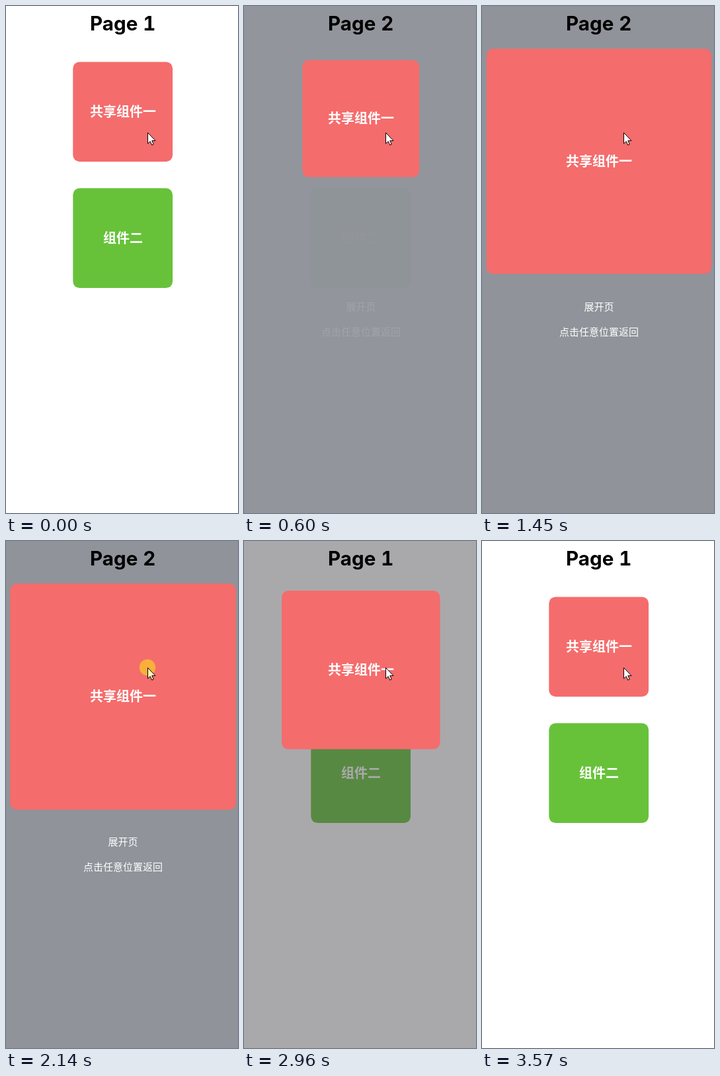
Animation of 351 by 766 pixels, one loop 3.85 s. Source, as an HTML page:

```html
<!DOCTYPE html>
<html lang="zh-CN">
<head>
<meta charset="utf-8">
<title>Shared element transition</title>
<style>
  html, body { margin: 0; width: 100%; height: 100%; overflow: hidden; background: #fff; }
  svg { display: block; width: 351px; height: 766px; }
  text { font-family: "Noto Sans CJK SC", "Noto Sans CJK", "Noto Sans", sans-serif; text-anchor: middle; }
  .title { font: 700 29.6px Inter, sans-serif; font-variant-numeric: tabular-nums; text-anchor: start; }
  .label { font-size: 20px; font-weight: 700; fill: #fff; }
  .note { font-size: 15px; fill: #fff; }
</style>
</head>
<body>
<svg viewBox="0 0 351 766">
  <rect width="351" height="766" fill="#fff"/>
  <rect x="101.3" y="275.3" width="150.8" height="150.8" rx="10" fill="#67c23a"/>
  <text class="label" x="177" y="357.7">组件二</text>
  <rect id="shade" width="351" height="766"/>
  <g id="notes">
    <text class="note" x="177" y="459.7">展开页</text>
    <text class="note" x="177" y="497.7">点击任意位置返回</text>
  </g>
  <text id="title" class="title" x="127" y="37">Page 1</text>
  <rect id="card" rx="10" fill="#f56c6c"/>
  <text id="label" class="label" x="177">共享组件一</text>
  <circle id="tap" cx="214" cy="191" r="12.2" fill="#f8b03a"/>
  <path id="arrow" d="M214.5 191.5v16.4l3.7-3.4 2.6 5.6 2.5-1.1-2.5-5.5h5.2z"
        stroke="#000" stroke-width="1" stroke-linejoin="round"/>
</svg>
<script>
const LOOP = 3850;
const OPEN = 514, SHOW = 600;
const CLOSE = 2400, HIDE = 2470, CLOSE_TIME = 1070;
const GRAY = [144, 147, 154];

// Runs of evenly spaced picture changes: first, last, count
const RUNS = [
  [270, 330, 2], [600, 1090, 8], [1160, 1450, 6], [1580, 1650, 2],
  [1720, 1940, 4], [2140, 2270, 2], [2470, 2960, 8], [3100, 3570, 8]
];

const el = id => document.getElementById(id);
const [shade, notes, title, card, label, tap, arrow] =
  ["shade", "notes", "title", "card", "label", "tap", "arrow"].map(el);
const lerp = (a, b, p) => a + (b - a) * p;
const clamp = v => Math.min(1, Math.max(0, v));
const set = (node, attrs) => {
  for (const key in attrs) node.setAttribute(key, attrs[key]);
};

function hold(t) {
  let held = 0;
  for (const [first, last, count] of RUNS) {
    if (t < first) break;
    const step = (last - first) / (count - 1);
    held = first + step * Math.min(count - 1, Math.floor((t - first) / step + 1e-6));
  }
  return held;
}

// Critically damped spring, time in ms
function spring(ms) {
  const x = ms * 0.0075;
  return 1 - (1 + x) * Math.exp(-x);
}

function smooth(v) {
  const x = clamp(v);
  return x * x * (3 - 2 * x);
}

function expansion(t) {
  if (t < SHOW) return 0;
  if (t < HIDE) return spring(t - OPEN);
  return 1 - smooth((t - CLOSE) / CLOSE_TIME);
}

function draw(time) {
  const t = hold(time);
  const p = expansion(t);
  const opened = t >= SHOW && t < HIDE;
  const closing = t >= HIDE;

  const dim = closing ? 1 - 0.95 * (1 - p) : 1;
  set(shade, {
    fill: `rgb(${GRAY.map(c => Math.round(c * dim))})`,
    opacity: opened ? lerp(0.975, 1, p) : p
  });
  set(notes, { opacity: closing ? clamp(2 * p - 1) : p });
  title.textContent = opened ? "Page 2" : "Page 1";

  const size = lerp(150.8, 341.7, p);
  const y = lerp(84.4, 64.3, p);
  set(card, { x: lerp(101.3, 6.1, p), y, width: size, height: size });
  set(label, { y: y + size / 2 + 7 });

  const pressed = (t >= 270 && t < 330) || (t >= 2140 && t < 2270);
  set(tap, { opacity: pressed ? 1 : 0 });
  set(arrow, { fill: pressed ? "#fff3bc" : "#fff" });
}

const start = performance.now();
function tick() {
  draw((performance.now() - start) % LOOP);
  requestAnimationFrame(tick);
}
tick();
</script>
</body>
</html>
```
